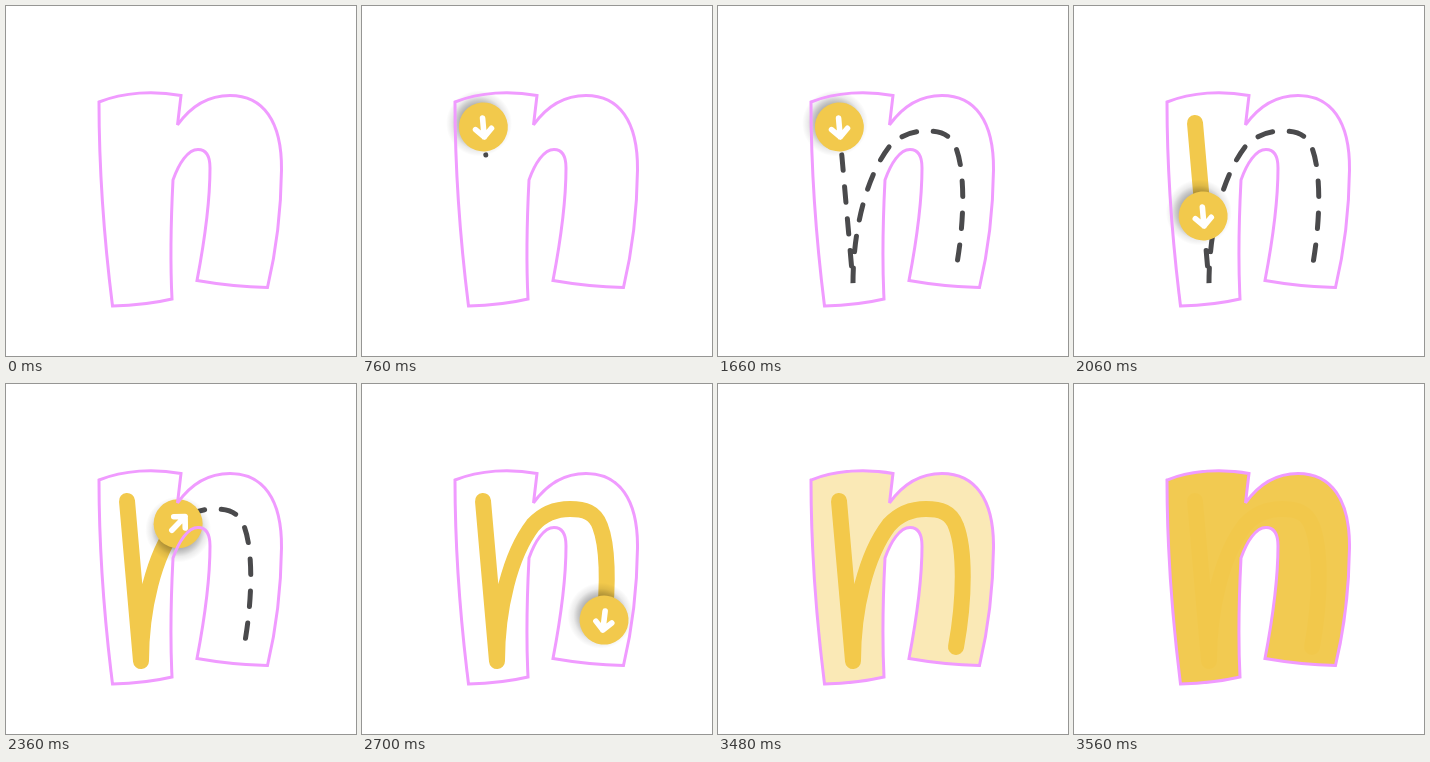
Animation, 350 px wide and 350 px high, one loop 4.8 s. Source, as an HTML page:

```html
<!DOCTYPE html>
<html lang="en">
<head>
<meta charset="utf-8">
<title>Tracing the letter n</title>
<style>
  html, body { margin: 0; width: 100%; height: 100%; overflow: hidden; background: #fff; }
  svg { display: block; width: 100%; height: 100%; }
  path { fill: none; stroke-linecap: round; }
</style>
</head>
<body>
<svg viewBox="0 0 350 350">
  <defs>
    <radialGradient id="shade">
      <stop offset=".58" stop-opacity=".3"/>
      <stop offset=".7" stop-opacity=".2"/>
      <stop offset=".82" stop-opacity=".08"/>
      <stop offset="1" stop-opacity="0"/>
    </radialGradient>
    <path id="letter" d="M93 96C118 86 148 84.5 175 89.5L171.5 119C185 100 203 89.5 224 89.5
      C257 89.5 276 115 275.5 164C275 210 269 250 261.5 281.5C237 281 214 278.5 191 274.5
      C197 243 204 195 204 162C204 150 200 143.5 192 143.5C182 143.5 173 157 167 174
      C165 213 164 253 166 293C147 297.5 127 299.5 106.5 300C98 232 93 165 93 96Z"/>
  </defs>
  <path id="dashes" stroke="#4a4a4c" stroke-width="5"/>
  <path id="trail" stroke="#f2c94c" stroke-width="16" stroke-linejoin="round"/>
  <g id="disc">
    <circle cx="-4" cy="4" r="33" fill="url(#shade)"/>
    <circle r="24.5" fill="#f2c94c"/>
    <path d="M-9 0H10M2 -8L10 0L2 8" stroke="#fff" stroke-width="5.6" stroke-linejoin="round"/>
  </g>
  <use id="fill" href="#letter" style="fill:#f2c94c"/>
  <use href="#letter" stroke="#f09bff" stroke-width="3"/>
</svg>
<script>
  const LOOP = 4800, DASH = 15.5, PERIOD = 32, INSET = 4;
  const STROKE = 'M121 117L135 277C135 225 148 171 171 141C181 130 194 125 208 125' +
    'C222 125 233 128 238 142C247 165 247 214 238 263';

  const el = id => document.getElementById(id);
  const dashes = el('dashes'), trail = el('trail'), disc = el('disc'), fill = el('fill');
  dashes.setAttribute('d', STROKE);
  trail.setAttribute('d', STROKE);
  // The letter's inside is painted on its own so the outline stays on top.
  el('letter').style.fill = 'inherit';
  document.querySelector('use:last-of-type').style.fill = 'none';
  const length = trail.getTotalLength();

  const ramp = (t, from, to) => Math.min(1, Math.max(0, (t - from) / (to - from)));
  const ease = x => x < .5 ? 2 * x * x : 1 - 2 * (1 - x) ** 2;

  function drawDashes(reach) {
    const list = [];
    for (let s = 0; s < reach; s += PERIOD) {
      const on = Math.min(DASH, reach - s);
      list.push(on, PERIOD - on);
    }
    list.push(0, 2000);
    // The closing pair would add a dot at the next slot, so widen the last gap instead.
    list.splice(-2);
    if (list.length) list[list.length - 1] = 2000;
    dashes.style.visibility = list.length ? 'visible' : 'hidden';
    dashes.setAttribute('stroke-dasharray', list.join(' '));
  }

  function placeDisc(s) {
    const p = trail.getPointAtLength(s);
    const a = trail.getPointAtLength(s - 1), b = trail.getPointAtLength(s + 1);
    const angle = Math.atan2(b.y - a.y, b.x - a.x) * 180 / Math.PI;
    disc.setAttribute('transform', `translate(${p.x} ${p.y}) rotate(${angle})`);
  }

  function draw(t) {
    drawDashes(length * ease(ramp(t, 540, 1780)));

    const travel = ease(ramp(t, 1710, 2880));
    trail.style.visibility = travel > 0 ? 'visible' : 'hidden';
    trail.setAttribute('stroke-dasharray', `${length * travel} 2000`);

    placeDisc(INSET + (length - 2 * INSET) * travel);
    disc.setAttribute('opacity', ramp(t, 20, 200) - ramp(t, 3080, 3200));
    fill.setAttribute('opacity', .97 * ramp(t, 3425, 3560));
  }

  const start = performance.now();
  function tick() {
    draw((performance.now() - start) % LOOP);
    requestAnimationFrame(tick);
  }
  tick();
</script>
</body>
</html>
```
